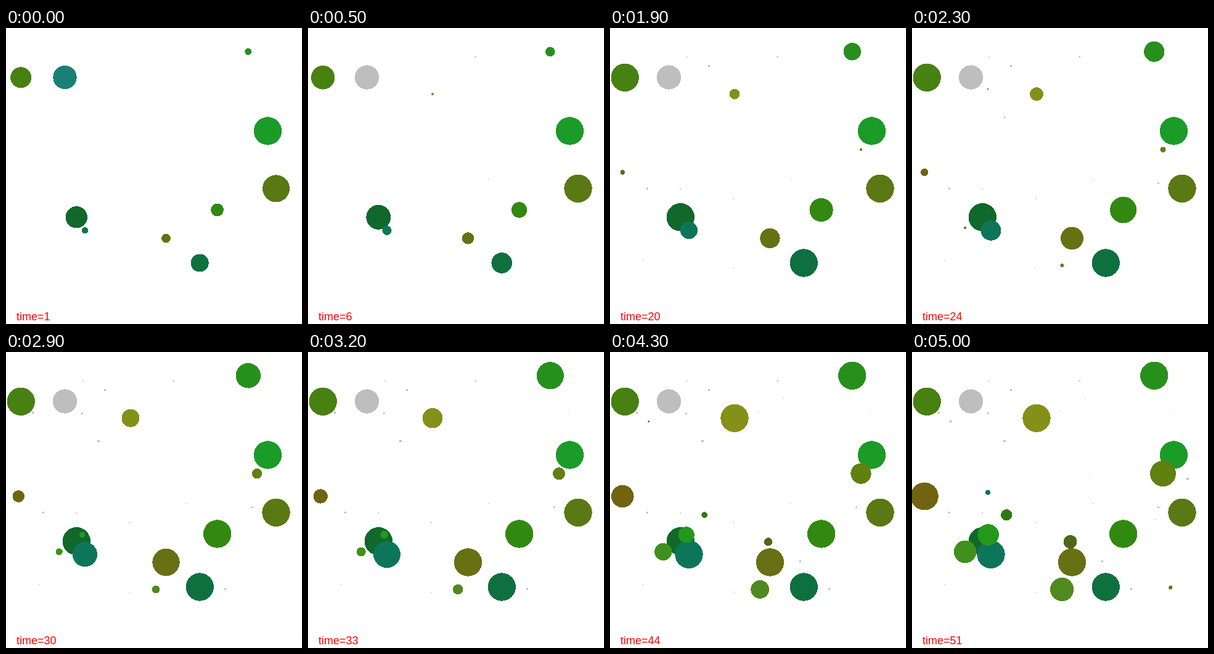
These frames come from a looping animation (480 by 480 pixels, 5100 ms). An HTML page:

```html
<!DOCTYPE html>
<html lang="en">
<head>
<meta charset="utf-8">
<title>Plant growth</title>
<style>
  html, body { margin: 0; width: 100%; height: 100%; overflow: hidden; background: #fff; }
  svg { display: block; width: 100vw; height: 100vh; }
  circle { shape-rendering: crispEdges; }
  text { font: 18px "Liberation Sans", Arial, sans-serif; fill: #f00; }
</style>
</head>
<body>
<svg viewBox="0 0 480 480">
  <g id="field"></g>
  <text id="label" x="17" y="474"></text>
</svg>
<script>
const STEP = 100, STEPS = 51, MAX_RADIUS = 22.7, SEEDLINGS = 28, DEAD = '#bebebe';
const field = document.getElementById('field');
const label = document.getElementById('label');

// Radius gained since the first step: slow at first, faster from step 20 on.
const growth = time => .46 * (time - 1) + .146 * Math.max(0, time - 20);

let seed = 12;
function random(min, max) {
  seed = (seed * 16807) % 2147483647;
  return min + (max - min) * seed / 2147483647;
}

const plants = [];
// A plant shows once growth exceeds its sprout level; a negative level is a head start.
function addPlant(x, y, color, sprout, death = Infinity) {
  const node = document.createElementNS('http://www.w3.org/2000/svg', 'circle');
  node.setAttribute('cx', x);
  node.setAttribute('cy', y);
  field.append(node);
  plants.push({ node, color, sprout, death });
}

// Seedlings appear at a steady pace all over the field and soon die.
for (let i = 0; i < SEEDLINGS; i++) {
  const death = 4 + i * 48 / SEEDLINGS;
  const color = `hsl(${random(50, 165)} 70% 25%)`;
  addPlant(random(20, 455), random(20, 420), color, growth(death) - random(.5, 2), death);
}

// Plants there from the start
addPlant(95.5, 80, '#198076', -19.2, 2);
addPlant(24.2, 80.3, '#478111', -17);
addPlant(392.8, 38.3, '#27901d', -5.5);
addPlant(424.5, 167, '#1b9b27', -MAX_RADIUS);
addPlant(438, 260.3, '#5a7814', -22);
addPlant(114.3, 306.8, '#10682a', -17.7);
addPlant(128, 328.2, '#0d765a', -5.3);
addPlant(342.6, 295, '#328911', -10.4);
addPlant(259.5, 341, '#687014', -7.4);
addPlant(314.2, 381, '#0e703f', -14.5);

// Later plants, in order of sprouting
addPlant(202, 107.2, '#859018', .3);
addPlant(20.3, 234, '#706410', 5);
addPlant(407, 197.2, '#608010', 6.6);
addPlant(243.2, 385, '#50891f', 8.4);
addPlant(86.2, 324, '#40901c', 9.2);
addPlant(123.7, 296.4, '#24981c', 10.2);
addPlant(256.6, 307.8, '#4c6818', 16.6);
addPlant(153.2, 264.2, '#307814', 18.4);
addPlant(123, 227.7, '#107060', 23.6);
addPlant(419.4, 382, '#786c10', 24.4);

const start = performance.now();
let shown;
function draw(now) {
  const time = 1 + Math.floor(Math.max(0, now - start) / STEP) % STEPS;
  if (time !== shown) {
    shown = time;
    for (const { node, color, sprout, death } of plants) {
      const radius = growth(Math.min(time, death)) - sprout;
      node.setAttribute('r', Math.max(0, Math.min(MAX_RADIUS, radius)));
      node.setAttribute('fill', time < death ? color : DEAD);
    }
    label.textContent = 'time=' + time;
  }
  requestAnimationFrame(draw);
}
draw(start);
</script>
</body>
</html>
```
